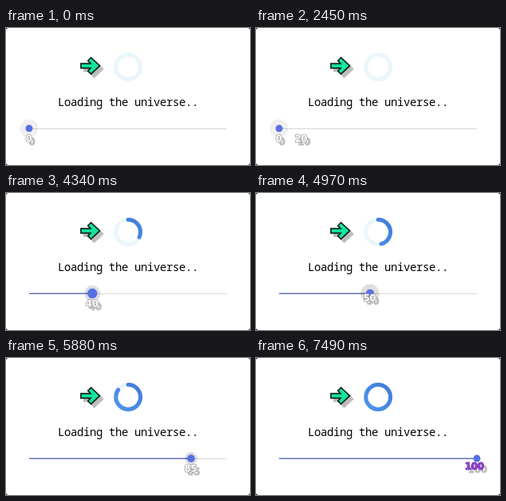
Recreate the animation shown at these times as an HTML page. Size 306 px wide and 172 px high, loop 8190 ms.

```html
<!DOCTYPE html>
<html lang="en">
<head>
<meta charset="utf-8">
<title>Loading</title>
<style>
  html, body { margin: 0; width: 100%; height: 100%; overflow: hidden; background: #000; }
  svg { display: block; width: 100vw; height: 100vh; }
  .title { font: 500 14px "Noto Sans Mono", monospace; letter-spacing: -.4px; }
  .label { font: bold 11.4px "DejaVu Sans", sans-serif; text-anchor: middle; }
  .face { fill: #fff; stroke: #a0a0a0; stroke-width: 1.6; paint-order: stroke; stroke-linejoin: round; }
  .ghost { fill: #bdbdbd; stroke: #bdbdbd; stroke-width: .9; }
  .done .face { fill: #9440d8; stroke: #5c2596; stroke-width: 1.1; }
</style>
</head>
<body>
<svg viewBox="0 0 306 172">
  <defs>
    <linearGradient id="blue" gradientUnits="userSpaceOnUse" x1="135" y1="31" x2="171" y2="67">
      <stop stop-color="#4e97ec"/>
      <stop offset="1" stop-color="#4079d8"/>
    </linearGradient>
    <path id="arrow" d="M94 44.6H106L102.8 41L106.6 37.2L117.6 47.4L106.6 57.8L102.8 54L106 50.4H94Z" stroke-width="1.7"/>
  </defs>
  <rect width="306" height="172" rx="3" fill="#fff"/>

  <use href="#arrow" x="4" y="4" fill="#bdbdbd" stroke="#bdbdbd"/>
  <use href="#arrow" fill="#12e69c" stroke="#10201c"/>

  <g fill="none" stroke-width="5">
    <circle cx="153.2" cy="49" r="15.4" stroke="#eaf6fc"/>
    <circle id="ring" cx="153.2" cy="49" r="15.4" stroke="url(#blue)" stroke-linecap="round"
      pathLength="100" transform="rotate(-90 153.2 49)"/>
  </g>

  <text class="title" x="64.9" y="97.8">Loading the universe..</text>

  <path d="M29 126.5H277" stroke="#d6d6d6"/>
  <path id="fill" stroke="#6274b4" stroke-width="1.6"/>
  <circle id="halo" cy="126.1" fill="#000"/>
  <circle id="thumb" cy="126.1" fill="#5870e2"/>
  <g id="labels"></g>
</svg>
<script>
const LOOP = 8190;
const $ = id => document.getElementById(id);
const clamp = v => Math.max(0, Math.min(1, v));
const set = (el, attrs) => {
  for (const name in attrs) el.setAttribute(name, attrs[name]);
};

// Each stop: start time, thumb x, label, and optional overrides
const stops = [
  { at: -1000, x: 29, text: 0 },
  { at: 2590, x: 57, text: 20, show: 2450 },
  { at: 3570, x: 84, text: 35 },
  { at: 4200, x: 108.3, text: 40 },
  { at: 4760, x: 143, text: 50, y: 136 },
  { at: 5180, x: 185, text: 65 },
  { at: 5810, x: 232, text: 85, ring: 85 },
  { at: 6650, x: 277, text: 100, labelX: 274, y: 139.5, last: true }
];

$('labels').innerHTML = stops.map(({ x, text, labelX = x - 0.4, y = 143.4, last }) =>
  `<g class="label${last ? ' done' : ''}" transform="translate(${labelX} ${y})">
    <text class="ghost" x="4" y="4">${text}</text><text class="face">${text}</text></g>`).join('');
const labels = [...$('labels').children];

function draw(t) {
  const index = stops.findLastIndex(s => t >= s.at);
  const { at, x, last, ring = (x - 29) / 2.48 } = stops[index];
  const age = t - at;

  set($('fill'), { d: `M29 126.3H${x}` });
  set($('ring'), {
    'stroke-dasharray': ring >= 100 ? 'none' : `${ring} 200`,
    visibility: ring > 0 ? 'visible' : 'hidden'
  });

  const fade = clamp((age - 210) / (last ? 280 : 210));
  const rest = last ? 0 : 0.06;
  set($('halo'), { cx: x, r: Math.min(11.6, 6 + age / 35), opacity: 0.13 + (rest - 0.13) * fade });
  const pulse = Math.sin(Math.PI * clamp(age / 300)) ** 4;
  set($('thumb'), { cx: x, r: 4.5 + 1.8 * pulse });

  labels.forEach((label, i) => {
    const { at, show = at } = stops[i];
    const end = i + 1 < stops.length ? stops[i + 1].at : LOOP;
    label.style.display = t >= show && t < end ? '' : 'none';
  });
}

const start = performance.now();
function tick() {
  draw((performance.now() - start) % LOOP);
  requestAnimationFrame(tick);
}
tick();
</script>
</body>
</html>
```
